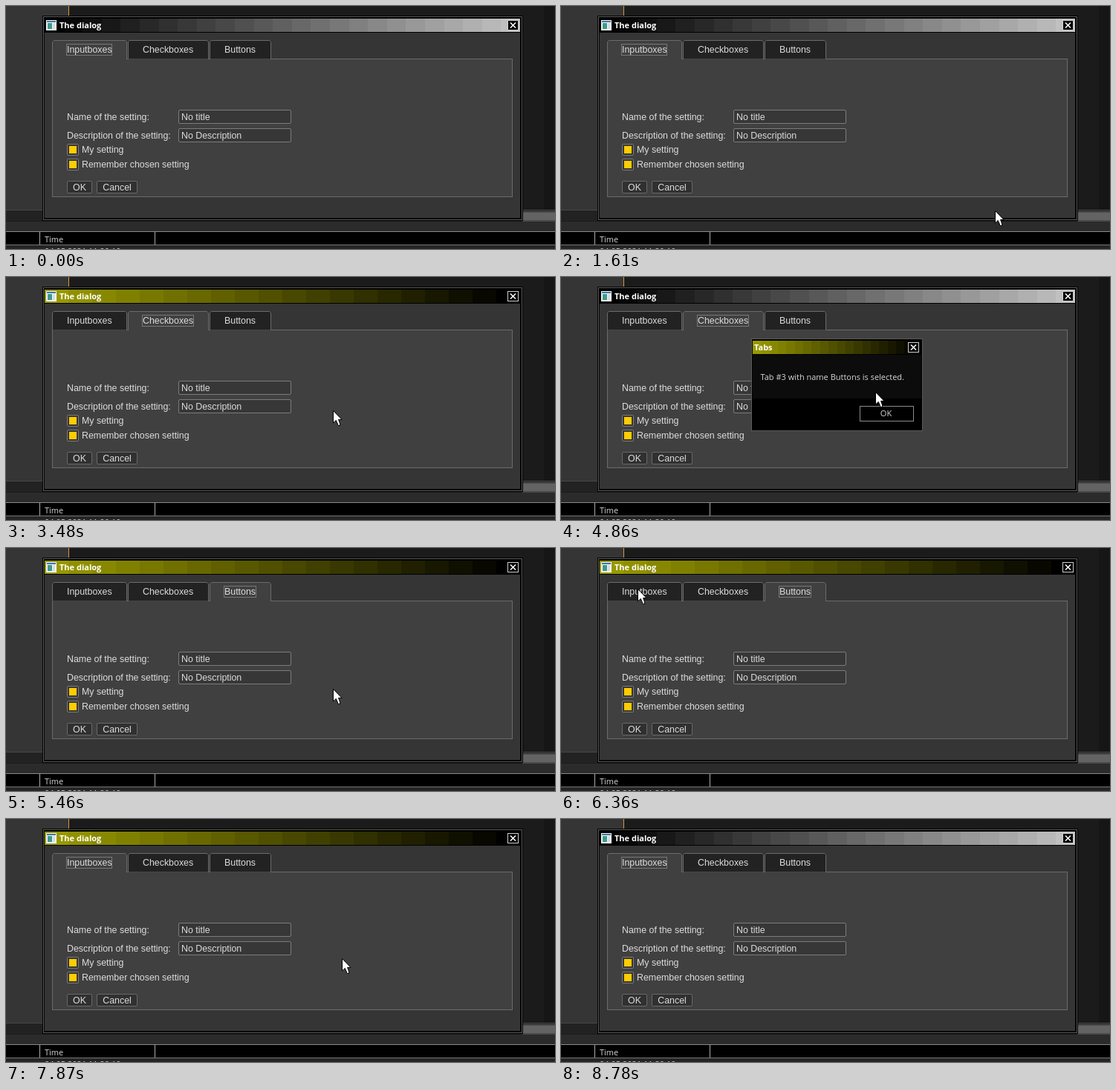
Animation of 739x328 px, one loop 8840 ms. Source, as an HTML page:

```html
<!DOCTYPE html>
<html lang="en">
<head>
<meta charset="utf-8">
<title>Dialog with tabs</title>
<style>
  html, body { margin: 0; width: 100%; height: 100%; overflow: hidden; background: #1b1b1b; }
  svg { display: block; }
  text { font: 12.4px "Liberation Sans", Arial, sans-serif; fill: #dcdcdc; white-space: pre; }
  .caption { font: bold 11px "Open Sans", sans-serif; fill: #fff; }
  .small { font: 11px "Open Sans", sans-serif; fill: #d6d6dc; }
  .field { fill: #373737; stroke: #7c7c7c; }
  .button { fill: #303030; stroke: #686868; }
  .tab path { fill: #222; stroke: #6b6b6b; }
  .tab.active path { fill: #404040; }
  .tab .focus { fill: none; stroke: #b0b0b0; stroke-dasharray: 1 1; visibility: hidden; }
  .tab.active .focus { visibility: visible; }
  .tab .seam { fill: #404040; visibility: hidden; }
  .tab.active .seam { visibility: visible; }
</style>
</head>
<body>
<svg id="stage" width="739" height="328" viewBox="0 0 739 328">
  <g id="backdrop"></g>
  <g id="dialog"></g>
  <g id="popups"></g>
  <g id="pointer">
    <g id="ring" fill="none">
      <circle cx="1.5" cy="1.5" r="9.7" stroke="#000" stroke-width="1.6"/>
      <circle cx="1.5" cy="1.5" r="9" stroke="#fff" stroke-width="1.2"/>
    </g>
    <path d="M.5 .5V17L4.3 13.4L7.3 20.5H9.6V18L7.6 12.4H12Z" fill="#fff" stroke="#000"/>
  </g>
</svg>
<script>
const LOOP = 8840, STEP = 60;
const $ = id => document.getElementById(id);

// Shape helpers
const box = (x, y, w, h, fill) => `<rect x="${x}" y="${y}" width="${w}" height="${h}" fill="${fill}"/>`;
const frame = (x, y, w, h, attrs) => `<rect x="${x + .5}" y="${y + .5}" width="${w - 1}" height="${h - 1}" ${attrs}/>`;
const label = (x, y, s, attrs = '') => `<text x="${x}" y="${y}" ${attrs}>${s}</text>`;

// Caption bars fade in coarse bands, eight colour levels apart
function bands(x, y, w, h, count, colour) {
  let out = '';
  for (let i = 0; i < count; i++) {
    const left = Math.round(x + i * w / count);
    out += box(left, y, Math.round(x + (i + 1) * w / count) - left, h, colour(i));
  }
  return out;
}
const greyBand = i => `rgb(${8 * i},${8 * i},${8 * i})`;
const oliveBand = i => `rgb(${152 - 8 * i},${152 - 8 * i},0)`;

const closeButton = (x, y) => frame(x, y, 15, 14, 'fill="#000" stroke="#d0d0d0"') +
  `<path d="M${x + 4} ${y + 3.5}l7 7m0 -7l-7 7" stroke="#fff" stroke-width="1.6"/>`;

$('backdrop').innerHTML =
  box(0, 0, 84, 276, '#353535') + box(84, 0, 1, 276, '#e0953a') +
  box(724, 0, 15, 276, '#161616') +
  box(0, 275, 739, 1, '#484848') + box(0, 276, 739, 14, '#222') +
  box(695, 277, 44, 14, '#4a4a4a') + box(695, 279, 44, 10, '#636363') +
  box(0, 291, 739, 13, '#2b2b2b') + box(0, 304, 739, 19, '#000') +
  box(0, 304, 739, 1, '#8a8a8a') + box(0, 322, 739, 1, '#777') +
  box(45, 305, 1, 17, '#aaa') + box(200, 305, 1, 17, '#aaa') +
  box(0, 323, 739, 5, '#252525') +
  label(52, 319, 'Time', 'class="small"') +
  label(52, 335, '04.05.2021 11:20:19', 'class="small"');

const tab = (x, w, name, textWidth) => `<g class="tab">
  <path d="M${x + .5} 71.5V48.5l2 -2h${w - 5}l2 2V71.5"/>
  <rect class="seam" x="${x + 1}" y="71" width="${w - 2}" height="1"/>
  <rect class="focus" x="${x + 19.5}" y="51.5" width="${textWidth + 1}" height="15"/>
  ${label(x + 20, 63, name)}</g>`;

const check = (y, name) => frame(82, y, 16, 16, 'class="field" rx="1"') +
  box(85, y + 3, 10, 10, '#ffcc00') + label(102, y + 12, name);
const field = (y, name, value) => label(82, y + 14, name) +
  frame(232, y, 152, 19, 'class="field" rx="1.5"') + label(236, y + 14, value);
const button = (x, w, name) => frame(x, 236, w, 17, 'class="button" rx="1.5"') +
  label(x + w / 2, 249, name, 'text-anchor="middle"');

$('dialog').innerHTML =
  box(49, 13, 647, 277, '#000') +
  frame(50, 14, 645, 275, 'fill="none" stroke="#5c5c5c"') +
  box(51, 15, 643, 273, '#000') + box(52, 36, 640, 250, '#353535') +
  `<g id="inactive">${bands(52, 17, 640, 18, 25, greyBand)}</g>` +
  `<g id="focused">${bands(52, 17, 640, 18, 20, oliveBand)}</g>` +
  box(54, 19, 14, 14, '#f4f4f4') + box(55, 20, 12, 2, '#3a78a8') +
  box(56, 23, 6, 8, '#3f9a8c') + box(63, 23, 3, 8, '#d5dde2') +
  label(72, 30, 'The dialog', 'class="caption"') + closeButton(675, 19) +
  frame(62, 71, 620, 187, 'fill="#404040" stroke="#6b6b6b"') +
  tab(62, 101, 'Inputboxes', 60) + tab(164, 109, 'Checkboxes', 68) + tab(274, 83, 'Buttons', 42) +
  field(140, 'Name of the setting:', 'No title') +
  field(165, 'Description of the setting:', 'No Description') +
  check(186, 'My setting') + check(206, 'Remember chosen setting') +
  button(82, 34, 'OK') + button(122, 55, 'Cancel');

function popup(left, right, text) {
  const w = right - left;
  return `<g>${box(left, 83, w, 125, '#000')}
    ${frame(left, 83, w, 125, 'fill="none" stroke="#5a5a5a"')}
    ${bands(left + 2, 86, w - 4, 18, 20, oliveBand)}
    ${box(left + 2, 105, w - 4, 59, '#0c0c0c')}
    ${label(left + 4, 99, 'Tabs', 'class="caption"')}
    ${closeButton(right - 20, 88)}
    ${label(left + 12.5, 139, text, 'class="small"')}
    ${frame(right - 85, 174, 73, 21, 'fill="#000" stroke="#8c8c8c"')}
    ${label(right - 49.5, 188, 'OK', 'class="small" text-anchor="middle"')}</g>`;
}
$('popups').innerHTML =
  popup(245, 497, 'Tab #2 with name Checkboxes is selected.') +
  popup(256, 487, 'Tab #3 with name Buttons is selected.') +
  popup(247, 496, 'Tab #1 with name Inputboxes is selected.');

// Pointer moves: start, number of steps, target, sideways bend, easing
const inOut = p => (1 - Math.cos(Math.PI * p)) / 2;
const out = p => 1 - (1 - p) ** 2;
const origin = [647, 314];
const moves = [
  { at: 1490, n: 12, to: [217, 53], bend: [0, 0], ease: inOut },
  { at: 2640, n: 11, to: [440, 180], bend: [0, 0], ease: inOut },
  { at: 3540, n: 10, to: [330, 63], bend: [0, 0], ease: inOut },
  { at: 4440, n: 14, to: [440, 190], bend: [5, -19], ease: out },
  { at: 5640, n: 12, to: [103, 55], bend: [0, 0], ease: inOut },
  { at: 6850, n: 14, to: [452, 188], bend: [-2, -7], ease: inOut },
  { at: 7930, n: 10, to: [742, 332], bend: [0, 0], ease: inOut }
];
const clicks = [2210, 3360, 4140, 5340, 6420, 7750];
const popupSpans = [[2210, 3360], [4140, 5340], [6420, 7750]];
const focusSpans = [[3360, 4140], [5340, 6420], [7750, 8780]];

const within = (t, [from, to]) => t >= from && t < to;
const show = (el, on) => el.style.visibility = on ? 'visible' : 'hidden';
const tabs = [...document.querySelectorAll('.tab')];
const popups = [...$('popups').children];

function pointerAt(t) {
  let from = origin;
  for (const { at, n, to, bend, ease } of moves) {
    const p = Math.min(1, (Math.floor((t - at) / STEP) + 1) / n);
    if (p <= 0) break;
    const e = ease(p), start = from;
    from = start.map((v, i) => Math.round(v + (to[i] - v) * e + bend[i] * 4 * e * (1 - e)));
    if (p < 1) break;
  }
  return from;
}

function render(t) {
  const active = t < 3360 || t >= 7750 ? 0 : t < 5340 ? 1 : 2;
  tabs.forEach((el, i) => el.classList.toggle('active', i === active));
  popups.forEach((el, i) => show(el, within(t, popupSpans[i])));
  show($('focused'), focusSpans.some(span => within(t, span)));
  const visible = within(t, [1490, 8470]);
  show($('pointer'), visible);
  show($('ring'), visible && clicks.some(c => within(t, [c, c + 120])));
  $('pointer').setAttribute('transform', `translate(${pointerAt(t)})`);
}

const began = performance.now();
function tick() {
  render((performance.now() - began) % LOOP);
  requestAnimationFrame(tick);
}
tick();
</script>
</body>
</html>
```
